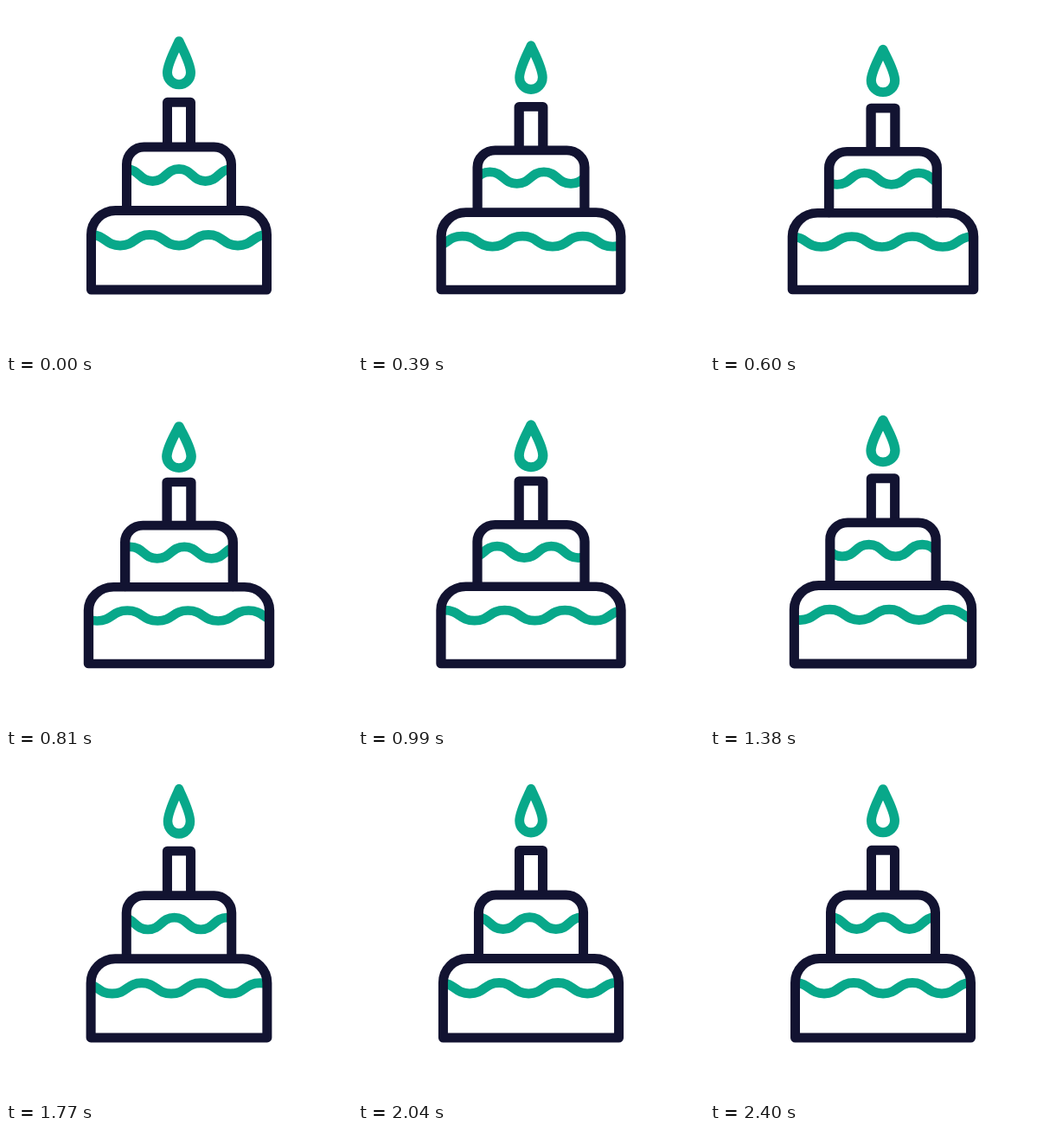
Write an HTML page that moves like this. It is 400 px wide and 400 px high and loops after 2430 ms.

```html
<!DOCTYPE html>
<html lang="en">
<head>
<meta charset="utf-8">
<title>Birthday cake</title>
<style>
  html, body { margin: 0; width: 100%; height: 100%; overflow: hidden; background: #fff; }
  svg { display: block; width: 100%; height: 100%; }
  path { fill: none; stroke-width: 11; stroke-linecap: round; stroke-linejoin: round; }
  .ink path { stroke: #121331; }
  .green { stroke: #08a88a; }
</style>
</head>
<body>
<svg viewBox="0 0 400 400">
  <defs>
    <clipPath id="upperClip"><rect x="139.5" y="170" width="121" height="60"/></clipPath>
    <clipPath id="lowerClip"><rect x="98.5" y="245" width="203" height="60"/></clipPath>
  </defs>
  <g id="cake">
    <g clip-path="url(#upperClip)"><path id="upper" class="green"/></g>
    <g clip-path="url(#lowerClip)"><path id="lower" class="green"/></g>
    <g class="ink">
      <path d="M186.5 162V111.3H213.5V162"/>
      <path d="M139.5 236V183A20 20 0 0 1 159.5 163H240.5A20 20 0 0 1 260.5 183V236"/>
      <path d="M98.5 328V264.4A28 28 0 0 1 126.5 236.4H273.5A28 28 0 0 1 301.5 264.4V328Z"/>
    </g>
  </g>
  <path id="flame" class="green" d="M200 40.7C197 48 186.5 66 186.5 77.2A13.5 13.5 0 0 0 213.5 77.2C213.5 66 203 48 200 40.7Z"/>
</svg>
<script>
const LOOP = 2430, FLOOR = 328, FLAME_TOP = 35.2, FLAME_END = 96.2;
const el = id => document.getElementById(id);
const cake = el('cake'), flame = el('flame'), upper = el('upper'), lower = el('lower');

// [time, value] keys
const squash = [[0, 0], [390, .74], [650, 1], [810, .97], [1170, .58], [1380, .36], [1770, .12], [2190, 0], [LOOP, 0]];
const tipDrop = [[0, 0], [100, -1], [390, 5], [570, 9], [810, 13], [1170, 8], [1380, 5.6], [1620, 1.3], [1770, -.5], [2100, -.4], [LOOP, 0]];
const baseDrop = [[0, 0], [390, 5.7], [810, 10.7], [1170, 8.3], [1380, 4], [1770, 1.5], [2190, 0], [LOOP, 0]];

// Smooth curve through the keys without overshoot
function sample(keys, t) {
  const slope = i => (keys[i + 1][1] - keys[i][1]) / (keys[i + 1][0] - keys[i][0]);
  const tangent = i => {
    if (i === 0 || i === keys.length - 1) return 0;
    const a = slope(i - 1), b = slope(i);
    return a * b <= 0 ? 0 : 2 * a * b / (a + b);
  };
  let i = 0;
  while (i < keys.length - 2 && t > keys[i + 1][0]) i++;
  const [t0, v0] = keys[i], [t1, v1] = keys[i + 1];
  const d = t1 - t0, u = (t - t0) / d, w = 1 - u;
  return v0 * (1 + 2 * u) * w * w + v1 * u * u * (3 - 2 * u)
    + d * (tangent(i) * u * w * w - tangent(i + 1) * u * u * w);
}

// cubic-bezier(1/3, 0, 1/6, 1)
function ease(x) {
  let lo = 0, hi = 1;
  for (let i = 0; i < 30; i++) {
    const s = (lo + hi) / 2, r = 1 - s;
    if (s * r * r + s * s * r / 2 + s * s * s < x) lo = s; else hi = s;
  }
  return lo * lo * (3 - 2 * lo);
}

// Icing line that starts on a crest
function wave(x, y, period, amp, count) {
  const h = period / 2, c = h / 2;
  const step = dy => `c${c} 0 ${h - c} ${dy} ${h} ${dy}`;
  return `M${x} ${y - amp}` + (step(2 * amp) + step(-2 * amp)).repeat(count);
}

const LONG = 68, SHORT = 61;
upper.setAttribute('d', wave(200 - 3 * SHORT, 195.5, SHORT, 6.9, 6));
lower.setAttribute('d', wave(166 - 3 * LONG, 270.7, LONG, 6.2, 7));

function draw(t) {
  const a = sample(squash, t), p = ease(t / LOOP);
  cake.setAttribute('transform',
    `translate(200 ${FLOOR}) scale(${1 + .031 * a} ${1 - .032 * a}) translate(-200 ${-FLOOR})`);
  upper.setAttribute('transform', `translate(${2 * SHORT * p % SHORT} 0)`);
  lower.setAttribute('transform', `translate(${3 * LONG * p % LONG} 0)`);

  const drop = sample(baseDrop, t), stretch = drop - sample(tipDrop, t);
  const sy = 1 + stretch / (FLAME_END - FLAME_TOP), sx = 1 - .02 * stretch;
  flame.setAttribute('transform',
    `translate(200 ${FLAME_END + drop}) scale(${sx} ${sy}) translate(-200 ${-FLAME_END})`);
}

const start = performance.now();
function tick() {
  draw((performance.now() - start) % LOOP);
  requestAnimationFrame(tick);
}
draw(0);
requestAnimationFrame(tick);
</script>
</body>
</html>
```
